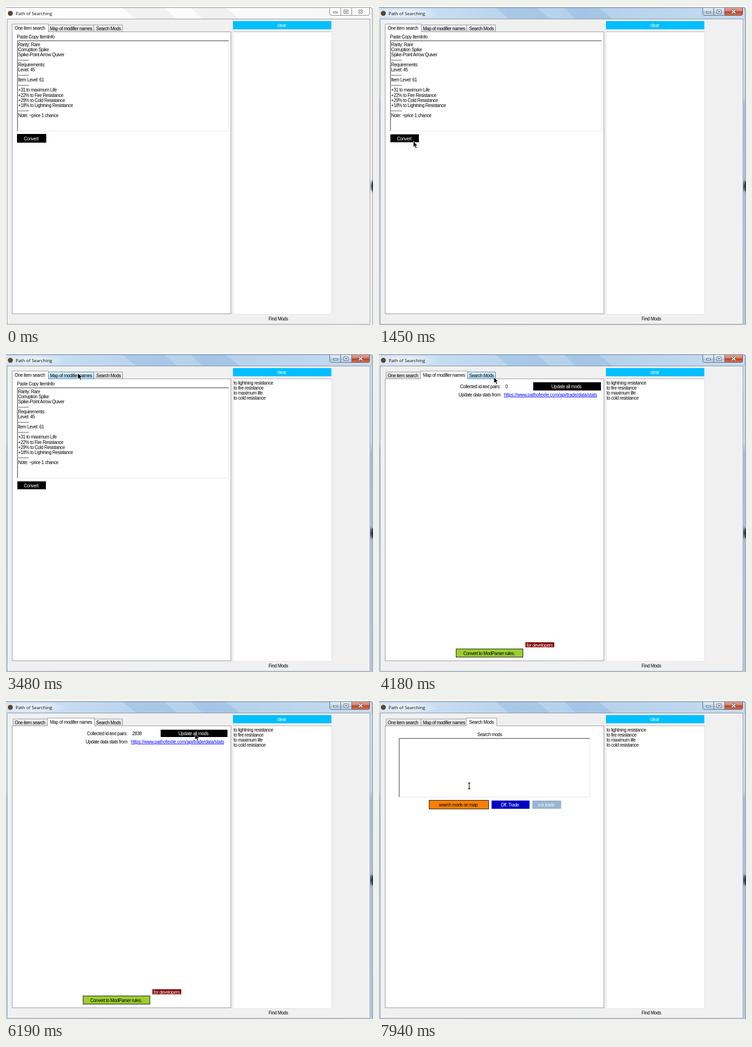
These frames come from a looping animation (802x698 px, 8000 ms). An HTML page:

```html
<!DOCTYPE html>
<html lang="en">
<head>
<meta charset="utf-8">
<title>Path of Searching</title>
<style>
  html, body { margin: 0; width: 100%; height: 100%; overflow: hidden; background: #fff; }
  svg { display: block; }
  text { font: 10px "Liberation Sans", Arial, sans-serif; letter-spacing: -.46px; white-space: pre; }
  .title { font: 9.8px "Open Sans", "Noto Sans", sans-serif; letter-spacing: 0; }
  .link { letter-spacing: -.17px; text-decoration: underline; }
</style>
</head>
<body>
<svg id="stage" width="802" height="698" viewBox="0 0 802 698">
  <defs>
    <linearGradient id="tab" x2="0" y2="1"><stop stop-color="#f3f3f3"/><stop offset="1" stop-color="#dcdcdc"/></linearGradient>
    <linearGradient id="hot" x2="0" y2="1"><stop stop-color="#e8f5fc"/><stop offset="1" stop-color="#a9d9f2"/></linearGradient>
    <linearGradient id="dim"><stop stop-color="#fff"/><stop offset=".6" stop-color="#fbfbfb"/><stop offset="1" stop-color="#f6f6f6"/></linearGradient>
    <linearGradient id="glass"><stop stop-color="#d3e3f4"/><stop offset=".3" stop-color="#bdd6ef"/><stop offset=".55" stop-color="#b3d0ec"/><stop offset="1" stop-color="#c5dbf1"/></linearGradient>
    <linearGradient id="side" x2="0" y2="1"><stop stop-color="#d6e6f6"/><stop offset=".25" stop-color="#d0e3f5"/><stop offset=".28" stop-color="#a9cdec"/><stop offset="1" stop-color="#b9d6ef"/></linearGradient>
    <linearGradient id="pane" x2="0" y2="1"><stop stop-color="#e4eef8"/><stop offset=".5" stop-color="#c5d8ec"/><stop offset=".55" stop-color="#adc6df"/><stop offset="1" stop-color="#c9dcef"/></linearGradient>
    <linearGradient id="close" x2="0" y2="1"><stop stop-color="#e6aa9d"/><stop offset=".45" stop-color="#d27a68"/><stop offset=".52" stop-color="#bd3f27"/><stop offset="1" stop-color="#d67a57"/></linearGradient>
    <radialGradient id="glow"><stop stop-color="#fff" stop-opacity=".75"/><stop offset="1" stop-color="#fff" stop-opacity="0"/></radialGradient>
    <radialGradient id="smudge"><stop stop-color="#222a33"/><stop offset=".5" stop-color="#4d5f70" stop-opacity=".8"/><stop offset="1" stop-color="#7fa3c4" stop-opacity="0"/></radialGradient>
  </defs>
</svg>
<script>
const LOOP = 8000;
const EDGE = '#898c95';
const stage = document.getElementById('stage');

const rect = (x, y, w, h, fill, stroke) => stroke
  ? `<rect x="${x + .5}" y="${y + .5}" width="${w - 1}" height="${h - 1}" fill="${fill}" stroke="${stroke}"/>`
  : `<rect x="${x}" y="${y}" width="${w}" height="${h}" fill="${fill}"/>`;
const path = (d, stroke, fill = 'none', width = 1) =>
  `<path d="${d}" fill="${fill}" stroke="${stroke}" stroke-width="${width}"/>`;
// y is the middle of the line of text
const text = (s, x, y, fill = '#000', anchor = 'start', cls = '') =>
  `<text x="${x}" y="${y + 3.5}" fill="${fill}" text-anchor="${anchor}" class="${cls}">${s}</text>`;
const lines = (list, x, y) => list.map((s, i) => text(s, x, y + i * 11.1)).join('');
const button = (s, x, y, w, h, fill, color, cx, stroke) =>
  rect(x, y, w, h, fill, stroke) + text(s, cx, y + h / 2 + .5, color, 'middle');
const sunken = (x, y, w, h) => rect(x, y, w, h, '#fff', '#e3e3e3') +
  path(`M${x + .5} ${y + h}V${y + .5}H${x + w}`, '#a0a0a0') +
  path(`M${x + 1.5} ${y + h - 1}V${y + 1.5}H${x + w - 1}`, '#696969');
const group = (id, content) => `<g id="${id}">${content}</g>`;

const tabNames = [['One item search', 19], ['Map of modifier names', 96], ['Search Mods', 197]];
const tabEdges = [[13, 92, 191, 254], [15, 90, 193, 254], [15, 91, 190, 257]];

function tab(view, i, fill, stroke) {
  const [left, right] = tabEdges[view].slice(i, i + 2);
  return rect(left, 41, right - left + 1, 16, fill, stroke) + text(tabNames[i][0], tabNames[i][1], 49.5);
}

function tabPage(view) {
  const [left, right] = tabEdges[view].slice(view, view + 2);
  const [name, x] = tabNames[view];
  return [0, 1, 2].filter(i => i !== view).map(i => tab(view, i, 'url(#tab)', EDGE)).join('') +
    rect(13, 56, 479, 618, '#fff', EDGE) +
    path(`M${left + .5} 57V39.5H${right + .5}V57`, EDGE, '#fff') +
    rect(left + 1, 56, right - left - 1, 2, '#fff') + text(name, x, 48);
}

function frame(active) {
  const ink = active ? '#4c5a69' : '#787878';
  const streak = active ? '#8fb5dc' : '#dedede';
  const pane = active ? 'url(#pane)' : '#fdfdfd';
  const glyph = active ? '#fff' : '#f4f4f4';
  const outline = active ? '#4a5868' : '#666';
  return rect(0, 3, 802, 695, `url(#${active ? 'glass' : 'dim'})`) +
    `<g fill="${streak}" opacity=".4"><path d="M255 4H345L375 29H285ZM405 4H480L512 29H430Z"/></g>` +
    (active ? rect(0, 29, 3, 669, 'url(#side)') + rect(795, 29, 6, 669, 'url(#side)') +
      '<ellipse cx="60" cy="16" rx="72" ry="14" fill="url(#glow)"/>' : rect(795, 29, 6, 669, '#fbfbfb')) +
    path('M0 3.5H797Q800.5 3.5 800.5 7V698', ink) + rect(801, 3, 1, 695, '#fff') +
    path('M707.5 4V17Q707.5 20.5 711 20.5H791Q794.5 20.5 794.5 17V4', ink, pane) +
    (active ? path('M755.5 4V20.5H791Q794.5 20.5 794.5 17V4', '#6b3029', 'url(#close)') : '') +
    path('M731.5 4V20M755.5 4V20', ink) +
    rect(715, 12, 10, 4, glyph, outline) + rect(738, 8, 10, 9, glyph, outline) + rect(741, 11, 4, 3, pane, outline) +
    path('M771 8.5L779 16M779 8.5L771 16', outline, 'none', 4) +
    path('M771.3 8.8L778.7 15.7M778.7 8.8L771.3 15.7', glyph, 'none', 2) +
    `<ellipse cx="${active ? 799 : 801}" cy="394" rx="6" ry="17" fill="url(#smudge)"/>` +
    rect(801, 384, 1, 21, '#111');
}

const itemInfo = ['Rarity: Rare', 'Corruption Spike', 'Spike-Point Arrow Quiver', '--------',
  'Requirements:', 'Level: 45', '--------', 'Item Level: 61', '--------', '+31 to maximum Life',
  '+22% to Fire Resistance', '+29% to Cold Resistance', '+18% to Lightning Resistance', '--------',
  'Note: ~price 1 chance'];
const mods = ['to lightning resistance', 'to fire resistance', 'to maximum life', 'to cold resistance'];

stage.innerHTML +=
  group('inactive', frame(false)) + group('active', frame(true)) +
  '<circle cx="9.5" cy="16" r="5.5" fill="#60452a"/>' +
  text('Path of Searching', 21, 16, '#000', 'start', 'title') +
  rect(2, 28, 794, 669, '#f0f0f0', '#82878d') +
  button('clear', 496, 33, 215, 18, '#00bfff', '#fff', 602.5) +
  rect(496, 56, 216, 619, '#fff', '#e2e3ea') + path('M496 56.5H712', '#abadb3') +
  group('found', lines(mods, 497.5, 65)) +
  text('Find Mods', 595, 684, '#000', 'middle') +
  group('view0', tabPage(0) + text('Paste Copy ItemInfo', 24, 67) + sunken(24, 75, 463, 199) +
    lines(itemInfo, 26.5, 84) + rect(24, 280, 64, 19, '#d8d8d8') +
    group('convertEdge', rect(24, 280, 64, 19, '#000')) +
    button('Convert', 25, 281, 62, 17, '#000', '#fff', 55)) +
  group('view1', tabPage(1) + text('Collected id-text pairs:', 265, 73, '#000', 'end') +
    '<text id="count" x="276" y="76.5"></text>' +
    text('Update data stats from', 265, 91.5, '#000', 'end') +
    text('https://www.pathofexile.com/api/trade/data/stats', 273, 91.5, '#00f', 'start', 'link') +
    group('updateEdge', rect(337, 64, 148, 18, '#000')) +
    button('Update all mods', 338, 65, 146, 16, '#000', '#fff', 409.5) +
    button('for developers', 320, 633, 63, 11, '#800000', '#fff', 351) +
    button('Convert to ModParser rules.', 168, 647, 147, 19, '#9acd32', '#000', 240.5, '#000')) +
  group('view2', tabPage(2) + text('Search mods', 242, 75, '#000', 'middle') + sunken(43, 83, 418, 130) +
    button('search mods on map', 109, 219, 131, 20, '#ff8000', '#000', 173, '#000') +
    button('Off. Trade', 246, 220, 83, 18, '#0000c0', '#fff', 286) +
    button('zok.trade', 335, 220, 63, 18, '#99b4d1', '#eef3f8', 365)) +
  group('hotMap', tab(0, 1, 'url(#hot)', '#3c7fb1')) +
  group('hotSearch', tab(1, 2, 'url(#hot)', '#3c7fb1')) +
  group('arrow', path('M0 0V13L3 10.3L5.3 15.3L7.6 14.3L5.4 9.4H9.4Z', '#fff', '#000', .9)) +
  group('beam', path('M-2.5 -6.5H2.5M0 -6.5V6.5M-2.5 6.5H2.5', '#fff', 'none', 2.6) +
    path('M-2.5 -6.5H2.5M0 -6.5V6.5M-2.5 6.5H2.5', '#000', 'none', 1.3));

// pointer way points: time, x, y
const route = [
  [210, 690, 502], [560, 285, 367], [990, 77, 298], [1070, 75, 296],
  [2679, 75, 296], [2680, 101, 260], [2780, 101, 260], [3160, 133, 34],
  [3330, 140, 38], [3480, 157, 44], [4000, 157, 44], [4180, 251, 53], [4260, 251, 53],
  [4620, 395, 79], [4790, 413, 74], [6359, 413, 74], [6360, 407, 71], [6480, 407, 71],
  [7010, 210, 54], [7660, 210, 54], [7940, 197, 188], [LOOP, 197, 188],
];

function pointer(t) {
  const next = route.findIndex(p => p[0] > t);
  if (next < 1) return route[0].slice(1);
  const [t0, x0, y0] = route[next - 1], [t1, x1, y1] = route[next];
  const k = (t - t0) / (t1 - t0);
  return [x0 + (x1 - x0) * k, y0 + (y1 - y0) * k];
}

const el = id => document.getElementById(id);
const show = (id, on) => el(id).setAttribute('visibility', on ? 'visible' : 'hidden');

function draw(now) {
  const t = now % LOOP;
  const view = t < 3630 ? 0 : t < 7310 ? 1 : 2;
  const [x, y] = pointer(t);
  const overTabs = y > 40 && y < 57;
  const inField = view === 0 ? x < 487 && y > 76 && y < 273 : view === 2 && y > 84;

  show('inactive', t < 1380);
  show('active', t >= 1380);
  show('found', t >= 1980);
  for (let i = 0; i < 3; i++) show('view' + i, i === view);
  show('convertEdge', view === 0 && t < 1450);
  show('updateEdge', view === 1 && t < 4960);
  show('hotMap', view === 0 && t >= 3330);
  show('hotSearch', view === 1 && overTabs && x > 193 && x < 254);
  el('count').textContent = t < 6190 ? '0' : '2838';

  show('arrow', t >= 210 && !inField);
  show('beam', t >= 210 && inField);
  for (const id of ['arrow', 'beam']) el(id).setAttribute('transform', `translate(${x} ${y})`);
}

const start = performance.now();
(function tick() {
  draw(performance.now() - start);
  requestAnimationFrame(tick);
})();
</script>
</body>
</html>
```
